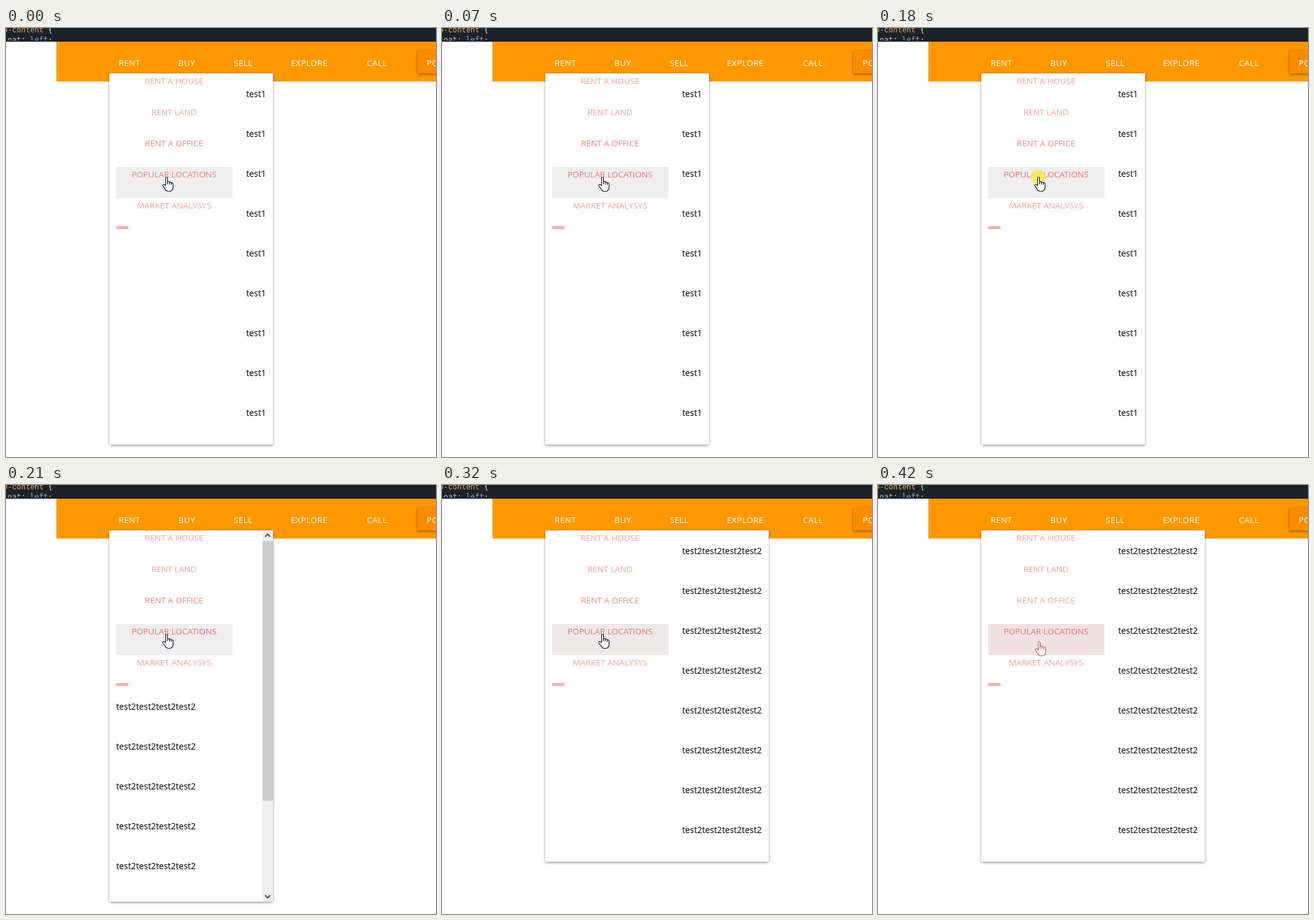
An HTML page with a canvas for the animation above (0.49 s loop, 691 by 689 pixels).

```html
<!DOCTYPE html>
<html lang="en">
<head>
<meta charset="utf-8">
<title>Dropdown menu</title>
<style>
  html, body { margin: 0; width: 100%; height: 100%; overflow: hidden; background: #fff; }
  canvas { display: block; }
</style>
</head>
<body>
<canvas id="stage" width="691" height="689"></canvas>
<script>
const ctx = document.getElementById('stage').getContext('2d');
const STEP = 70, STEPS = 7;
const SANS = '"Open Sans", "Noto Sans", sans-serif';
const CODE = '12px "DejaVu Sans Mono", monospace';
const NAV = [['RENT', 181], ['BUY', 277], ['SELL', 366], ['EXPLORE', 458], ['CALL', 580]];
const ITEMS = ['RENT A HOUSE', 'RENT LAND', 'RENT A OFFICE', 'POPULAR LOCATIONS', 'MARKET ANALYSYS'];
// Colours that change from step to step
const OFFICE = ['#ee807c', '#ee807c', '#ee807c', '#ee7f7e', '#e98683', '#f0959a', '#f1a09f'];
const POPULAR = ['#ef817e', '#ed7880', '#ed6c77', '#ee6e78', '#e87575', '#ea6875', '#e97170'];
const HOVER = ['#eee', '#eee', '#eee', '#eee', '#eeeaea', '#efe5e5', '#f1e2e2'];
const HAND = new Path2D('M5.5 14V2Q5.5.5 7 .5T8.5 2V8Q10 6.8 11.5 8.8Q13 7.7 14.5 9.8Q17.5 9 17.5 12' +
  'V16Q17.5 23.5 11 23.5Q6.5 23.5 4.5 19.5L1 14.5Q.5 12 2.8 12.2Q4 12.5 5.5 14Z' +
  'M8.5 8V12M11.5 8.8V12.5M14.5 9.8V13');

function rect(color, x, y, w, h) {
  ctx.fillStyle = color;
  ctx.fillRect(x, y, w, h);
}

function text(str, x, y, color, font, align = 'left', spacing = 0) {
  ctx.font = font;
  ctx.fillStyle = color;
  ctx.textAlign = align;
  ctx.letterSpacing = spacing + 'px';
  ctx.fillText(str, x, y);
}

function raised(color, x, y, w, h) {
  ctx.save();
  ctx.shadowColor = 'rgba(0,0,0,.42)';
  ctx.shadowBlur = 4;
  ctx.shadowOffsetY = 1.5;
  ctx.fillStyle = color;
  ctx.beginPath();
  ctx.roundRect(x, y, w, h, 2);
  ctx.fill();
  ctx.restore();
}

function column(str, x, y, rows) {
  for (let i = 0; i < rows; i++) text(str, x, y + i * 64, '#000', '13.8px ' + SANS);
}

function chevron(y, dir) {
  ctx.strokeStyle = '#505050';
  ctx.lineWidth = 2;
  ctx.beginPath();
  ctx.moveTo(416.5, y + 2 * dir);
  ctx.lineTo(420.5, y - 2 * dir);
  ctx.lineTo(424.5, y + 2 * dir);
  ctx.stroke();
}

function scrollbar() {
  rect('#f0f0f0', 412, 73, 17, 596);
  rect('#cdcdcd', 412, 90, 17, 417);
  chevron(81, 1);
  chevron(661, -1);
}

function header() {
  rect('#1e2228', 0, 0, 691, 22);
  text('p-content', -4.7, 7, '#f0a45d', CODE);
  text('{', 67.5, 7, '#c3d8d8', CODE);
  text('oat:', 2.5, 23, '#b6c4d2', CODE);
  text('left', 38.6, 23, '#89a9cf', CODE);
  text(';', 67.5, 23, '#c5ced6', CODE);
  rect('#1e2228', 0, 20, 691, 2);
  rect('#fff', 0, 22, 691, 667);
  rect('#ff9800', 81, 22, 610, 64);
  raised('#fb8c00', 661, 36, 60, 37);
  for (const [str, x] of [...NAV, ['POST', 676]])
    text(str, x, 61, '#fff', '13.2px ' + SANS, 'left', 0.5);
}

function menu(step) {
  const wide = step > 3;
  raised('#fff', 166, 73, wide ? 359 : 263, wide ? 532 : 596);
  rect(HOVER[step], 177, 223, 187, 50);
  ITEMS.forEach((str, i) => {
    const color = i === 2 ? OFFICE[step] : i === 3 ? POPULAR[step] : '#f2a09f';
    text(str, 270, 90 + i * 50, color, '13.5px ' + SANS, 'center');
  });
  rect('#f4b3b0', 177, 318, 20, 5);
  if (wide) column('test2'.repeat(4), 386, 111, 8);
  else if (step === 3) {
    column('test2'.repeat(4), 177, 361, 5);
    scrollbar();
  } else column('test1', 386, 111, 9);
}

function pointer(step) {
  const last = step === 6;
  if (step === 2) {
    ctx.fillStyle = 'rgba(246,238,80,.8)';
    ctx.beginPath();
    ctx.arc(257, 239, 12, 0, 7);
    ctx.fill();
  }
  ctx.save();
  ctx.translate(last ? 252 : 251, last ? 251 : 239);
  ctx.fillStyle = last ? '#fbf3f3' : '#fff';
  ctx.strokeStyle = last ? '#b65a5a' : '#0c0c20';
  ctx.lineWidth = 1.1;
  ctx.fill(HAND);
  ctx.stroke(HAND);
  ctx.restore();
}

const start = performance.now();
function draw() {
  const step = Math.floor((performance.now() - start) / STEP) % STEPS;
  header();
  menu(step);
  pointer(step);
  requestAnimationFrame(draw);
}
draw();
</script>
</body>
</html>
```
